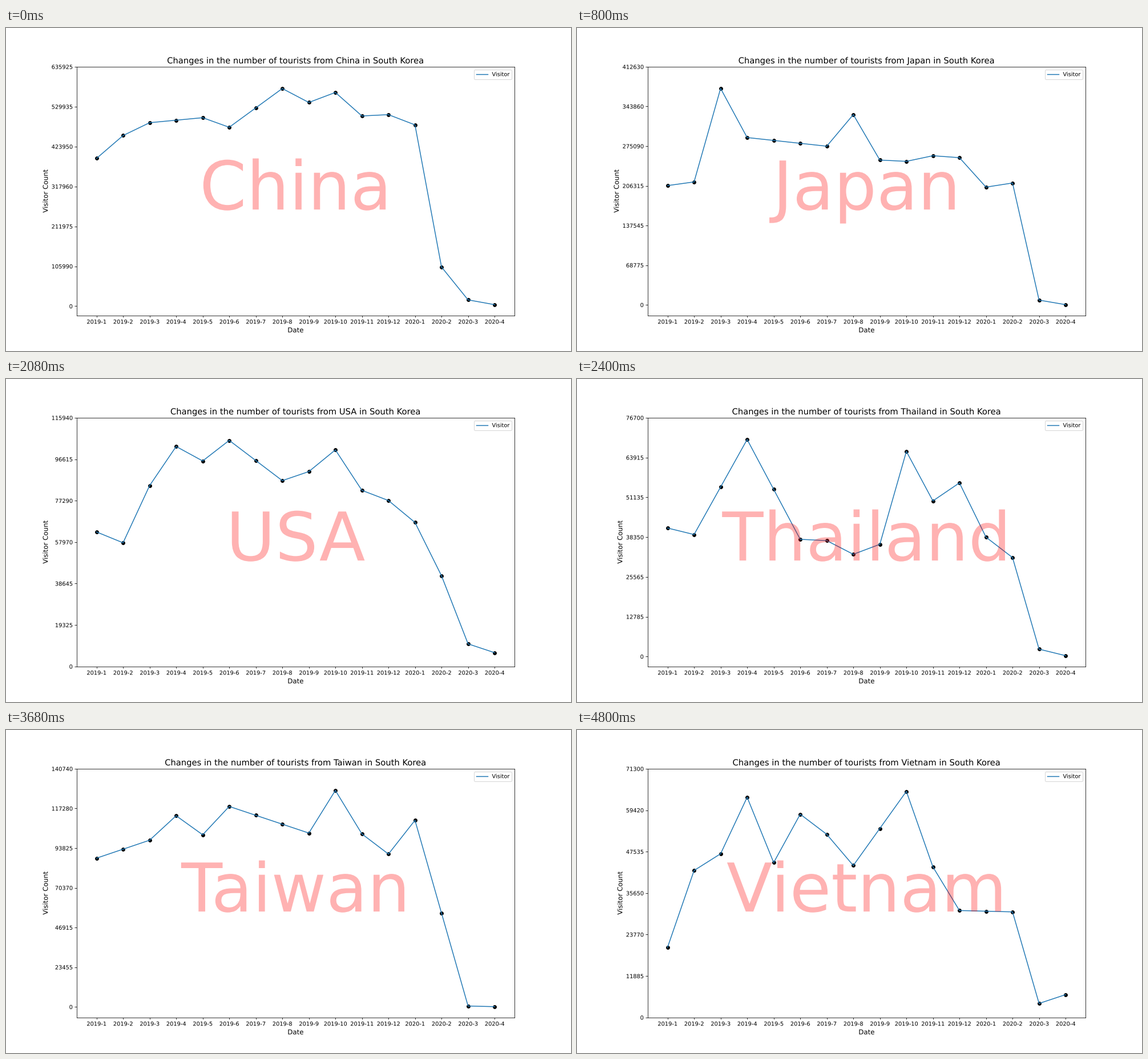
A matplotlib script that plays this animation: 990x566 px, repeating every 5600 ms.

```python
import numpy as np
import matplotlib.pyplot as plt
from matplotlib import patheffects
from matplotlib.animation import FuncAnimation

W, H = 990, 566
DPI = W / 14
EPS = 1e-6  # keeps the pixel size from truncating one short

plt.rcParams.update({
    "font.family": "DejaVu Sans",
    "text.hinting": "none",
    "path.effects": [patheffects.Normal()],  # outlines place glyphs between pixels
})

MONTHS = [f"{2019 + m // 12}-{m % 12 + 1}" for m in range(16)]
_ = np.nan  # a month on the straight line between its neighbours

# Peak month, then key points in thousandths of that peak
TRENDS = {
    "China": (578112, [679, 784, 843, _, 866, 822, _, 1000,
                       936, 982, 874, 880, 833, 180, 29, 7]),
    "Japan": (375119, [551, 568, 1000, 773, _, _, 733, 879,
                       669, 663, 689, 680, 544, 563, 22, 1]),
    "USA": (105397, [595, 547, 800, 973, 909, 1000, _, 822,
                     862, 958, 779, 734, 637, 401, 100, 61]),
    "Thailand": (69726, [592, 562, _, 1000, _, 540, 534, 471,
                         517, 945, 717, 800, 550, 456, 34, 4]),
    "Taiwan": (127943, [687, _, 770, 883, 795, 926, _, _,
                        803, 1000, 799, 706, 862, _, 4, 1]),
    "Hong Kong": (76103, [470, 673, 605, 1000, 748, 810, 775, 866,
                          603, 860, 769, 942, 879, 275, 2, 0]),
    "Vietnam": (64819, [310, 650, 724, 974, 685, 899, 810, 672,
                        _, 1000, 666, 473, _, 467, 62, 101]),
}
COUNTRIES = list(TRENDS)

fig, ax = plt.subplots(figsize=((W + EPS) / DPI, (H + EPS) / DPI), dpi=DPI)


def visitor_counts(peak, shares):
    """Monthly counts, with the gaps between key points filled linearly."""
    shares = np.array(shares, float)
    months = np.arange(len(shares))
    known = ~np.isnan(shares)
    return peak * np.interp(months, months[known], shares[known]) / 1000


def count_ticks(peak):
    """Seven ticks up to 110% of the peak, rounded to multiples of five."""
    step = peak * 1.1 / 6
    return [5 * round((k * step + 0.87) / 5) for k in range(7)]


def draw(i):
    country = COUNTRIES[i]
    peak, shares = TRENDS[country]
    counts = visitor_counts(peak, shares)
    ticks = count_ticks(peak)
    low = counts.min()

    ax.clear()
    ax.plot(MONTHS, counts, label="Visitor")
    ax.scatter(MONTHS, counts, color="black")
    ax.text(0.5, 0.5, country, transform=ax.transAxes, fontsize=120,
            color="red", alpha=0.3, ha="center", va="center")
    ax.set_yticks(ticks, [str(t) for t in ticks])
    ax.set_ylim(min(0, low - 0.05 * (peak - low)), ticks[-1])
    ax.set_title(f"Changes in the number of tourists from {country} in South Korea",
                 fontsize=15)
    ax.set_xlabel("Date", fontsize=12)
    ax.set_ylabel("Visitor Count", fontsize=12)
    ax.legend(loc="upper right")


anim = FuncAnimation(fig, draw, frames=len(COUNTRIES), init_func=lambda: draw(0),
                     interval=800, repeat=True, repeat_delay=0)
plt.show()
```
